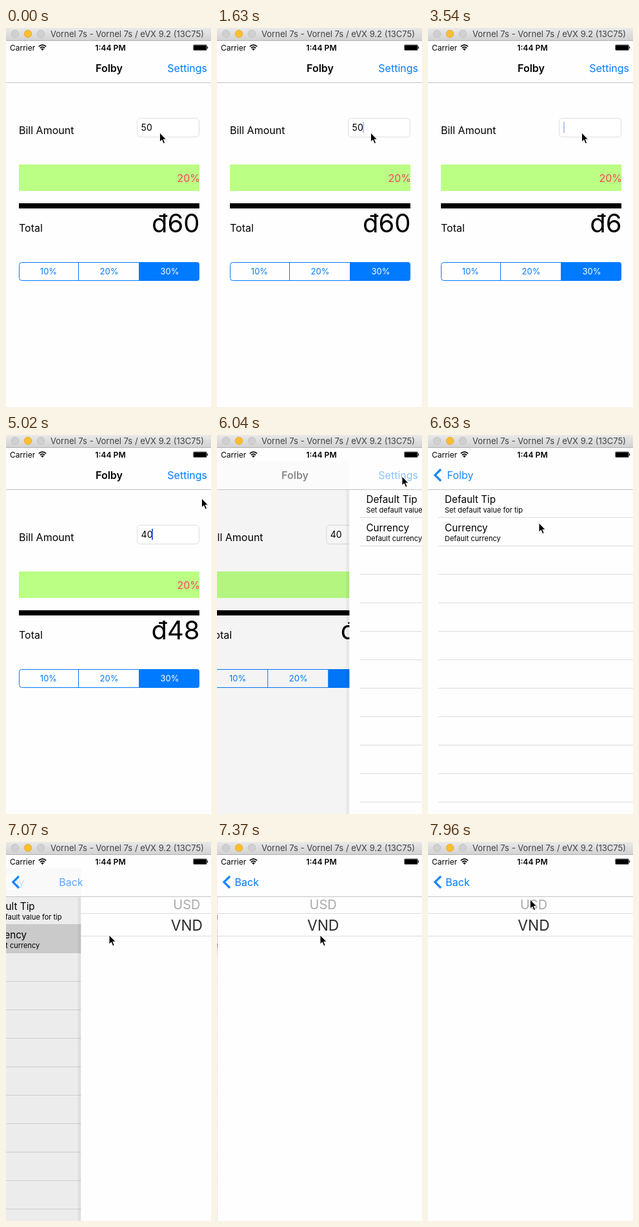
An HTML page for the animation above (8000 ms loop, 318x586 px).

```html
<!DOCTYPE html>
<html lang="en">
<head>
<meta charset="utf-8">
<title>Tip calculator</title>
<style>
  html, body { margin: 0; width: 100%; height: 100%; overflow: hidden; background: #fff; }
  svg { display: block; width: 100vw; height: 100vh; font: 16px Inter, Roboto, sans-serif; }
  text { white-space: pre; }
  .blue { fill: #007aff; }
  .mid { text-anchor: middle; }
  .end { text-anchor: end; }
  .bold { font-weight: 600; }
  .cell { font-size: 15.3px; }
  .note { font-size: 11px; }
  .seg { font-size: 13px; }
  .bg { fill: #fefefe; }
  .line { stroke: #dcdcdf; fill: none; }
</style>
</head>
<body>
<svg viewBox="0 0 318 586">
  <defs>
    <linearGradient id="chrome" x2="0" y2="1">
      <stop stop-color="#e9e9e9"/><stop offset="1" stop-color="#d1d1d1"/>
    </linearGradient>
  </defs>

  <g id="bill">
    <rect class="bg" width="318" height="586"/>
    <text x="20" y="164">Bill Amount</text>
    <rect x="203.5" y="139.5" width="96" height="29" rx="5" fill="#fff" stroke="#dedede"/>
    <text id="amount" x="209.6" y="159" font-size="14"></text>
    <rect id="caret" y="145" width="2" height="17" fill="#4568e0"/>
    <rect x="20" y="211" width="280" height="41" fill="#bbff84"/>
    <text class="end" x="301" y="238" fill="#f4455d">20%</text>
    <rect x="20" y="271" width="280" height="8"/>
    <text x="20" y="314.5">Total</text>
    <text id="total" class="end" x="300.5" y="316" font-size="40"></text>
    <path class="blue" d="M206 362H296a4 4 0 0 1 4 4V387a4 4 0 0 1-4 4H206Z"/>
    <rect x="20.5" y="362.5" width="279" height="28" rx="4" fill="none" stroke="#007aff"/>
    <path d="M112.5 362V391" stroke="#007aff"/>
    <g class="seg mid">
      <text class="blue" x="66" y="381">10%</text>
      <text class="blue" x="160" y="381">20%</text>
      <text x="254" y="381" fill="#fff">30%</text>
    </g>
    <rect id="billDim" width="318" height="586"/>
  </g>

  <g id="settings">
    <rect x="-5" y="84" width="5" height="502"/>
    <rect class="bg" width="318" height="586"/>
    <path id="rows" class="line"/>
    <rect id="picked" y="127" width="318" height="45" fill="#d9d9d9"/>
    <text class="cell" x="26" y="105">Default Tip</text>
    <text class="note" x="26" y="120">Set default value for tip</text>
    <text class="cell" x="26" y="149">Currency</text>
    <text class="note" x="26" y="164">Default currency</text>
    <rect id="settingsDim" width="318" height="586"/>
  </g>

  <g id="currency">
    <rect x="-5" y="84" width="5" height="502"/>
    <rect class="bg" width="318" height="586"/>
    <path class="line" d="M0 110.5H318M0 145.5H318"/>
    <text class="mid" x="164" y="104" font-size="20" fill="#aaa">USD</text>
    <text class="mid" x="164" y="136.5" font-size="22.8" fill="#2c2c2c">VND</text>
  </g>

  <!-- translucent navigation bar -->
  <rect class="bg" y="20" width="318" height="64" opacity=".75"/>
  <path d="M0 84.5H318" stroke="#c4c4c6"/>
  <text id="title" class="mid bold" y="68">Folby</text>
  <text id="open" class="blue end" x="312" y="68">Settings</text>
  <text id="home" class="blue mid" y="68">Folby</text>
  <g id="chevron">
    <rect class="bg" y="50" width="15" height="24"/>
    <path d="M20 53L10.8 62L20 71" fill="none" stroke="#007aff" stroke-width="3.2"/>
  </g>
  <text id="back" class="blue mid" y="68">Back</text>

  <rect class="bg" y="20" width="318" height="20"/>
  <text x="6" y="34.5" font-size="12">Carrier</text>
  <path d="M50.8 28.6Q56.5 23.6 62.2 28.6M52.9 31Q56.5 27.8 60.1 31" fill="none" stroke="#000" stroke-width="1.7"/>
  <path d="M54.2 32.4Q56.5 30.7 58.8 32.4L56.5 35Z"/>
  <text class="mid bold" x="162" y="34.5" font-size="12.2">1:44 PM</text>
  <rect x="290.5" y="26" width="21" height="8.5" rx="1.5" fill="none" stroke="#000" stroke-width=".8" opacity=".7"/>
  <rect x="291.2" y="26.6" width="19.6" height="7.3" rx=".6"/>
  <path d="M312.3 28.5Q313.8 30.2 312.3 32Z" stroke="#000" stroke-width=".6"/>

  <rect width="318" height="20" fill="url(#chrome)"/>
  <path d="M0 19.5H318" stroke="#b4b4b4"/>
  <g stroke-width=".8">
    <circle cx="14" cy="9" r="5.7" fill="#d0d0d0" stroke="#bcbcbc"/>
    <circle cx="34" cy="9" r="5.7" fill="#fdbe2e" stroke="#e0a32c"/>
    <circle cx="54" cy="9" r="5.7" fill="#d0d0d0" stroke="#bcbcbc"/>
  </g>
  <text x="69" y="14" font-size="13" fill="#404040">Vornel 7s - Vornel 7s / eVX 9.2 (13C75)</text>

  <path id="mouse" d="M0 0V14L3.3 11L5.7 16.7L8.1 15.6L5.7 10.2H10Z" stroke="#fff" stroke-width=".9"/>
</svg>

<script>
const LOOP = 8000, TICK = 147.3, PUSH = 500;
const el = {};
for (const node of document.querySelectorAll('[id]')) el[node.id] = node;

// Each list is keyed by tick number.
const entries = [[0, '50', 'đ60'], [15, '5', 'đ6'], [17, '', 'đ6'], [26, '4', 'đ5'], [27, '40', 'đ48']];
const blink = [[0, 0], [1, 1], [4, .4], [5, 0], [7, .4], [8, 1], [11, .4], [12, 0], [14, .4], [15, 1],
  [21, .4], [22, 0], [24, .4], [25, 1], [31, .4], [32, 0], [34, 1], [38, 0]];
const path = [[0, 238.5, 162], [29, 238.5, 162], [30, 245, 170], [31, 262, 176], [32, 286, 150],
  [33, 300, 118], [34, 303.5, 98], [35, 305, 76], [36, 294, 61], [37, 285, 62], [38, 287, 64],
  [42, 287, 64], [43, 262, 82], [44, 212, 116], [45, 172, 136], [46, 160, 144],
  [50, 160, 144], [53, 159, 96], [54, 158.5, 89]];

const at = (list, k) => list.findLast(item => item[0] <= k);
const clamp = v => Math.min(1, Math.max(0, v));
const push = age => 1 - (1 - clamp(age / PUSH)) ** 3;
const set = (node, attrs) => { for (const key in attrs) node.setAttribute(key, attrs[key]); };
const move = (node, x, y = 0) => set(node, { transform: `translate(${x} ${y})` });
const fade = (node, opacity) => set(node, { opacity: clamp(opacity) });

function mouseAt(k) {
  const from = at(path, k), to = path[path.indexOf(from) + 1] || from;
  const u = (k - from[0]) / (to[0] - from[0] || 1);
  return [1, 2].map(i => from[i] + (to[i] - from[i]) * u);
}

// Slides a page in from the right, with an edge shadow, while the page below dims.
function slide(page, below, p) {
  fade(page.firstElementChild, p > 0 && p < 1 ? .05 : 0);
  fade(below, .11 * p);
}

function draw(ms) {
  const k = Math.floor((ms + 10) / TICK);
  const time = k * TICK - 10;
  const p = push(time - 5961.5), q = push(time - 6918);

  const [, amount, total] = at(entries, k);
  el.amount.textContent = amount;
  el.total.textContent = total;
  set(el.caret, { x: 210 + 8 * amount.length });
  fade(el.caret, at(blink, k)[1]);

  move(el.bill, -95.4 * p);
  move(el.settings, 318 * (1 - p) - 95.4 * q);
  move(el.currency, 318 * (1 - q));
  slide(el.settings, el.billDim, p);
  slide(el.currency, el.settingsDim, q);
  fade(el.picked, k >= 46 ? 1 : 0);

  const arrived = clamp(4 * p - 3.1);
  const homeX = 160 - 110 * p;
  set(el.title, { x: homeX });
  fade(el.title, p ? .7 * (1 - p) : 1);
  fade(el.open, k === 40 ? .3 : p ? .7 * (1 - p) : 1);
  fade(el.chevron, arrived);
  set(el.home, { x: homeX - 66 * q });
  fade(el.home, arrived * (q ? .6 * (1 - q) : 1));
  set(el.back, { x: 46 + 150 * (1 - q) });
  fade(el.back, q);

  move(el.mouse, ...mouseAt(k));
}

set(el.rows, { d: Array.from({ length: 11 }, (_, i) => `M16 ${127.5 + 44 * i}H318`).join('') });

const start = performance.now();
function loop() {
  draw((performance.now() - start) % LOOP);
  requestAnimationFrame(loop);
}
loop();
</script>
</body>
</html>
```
